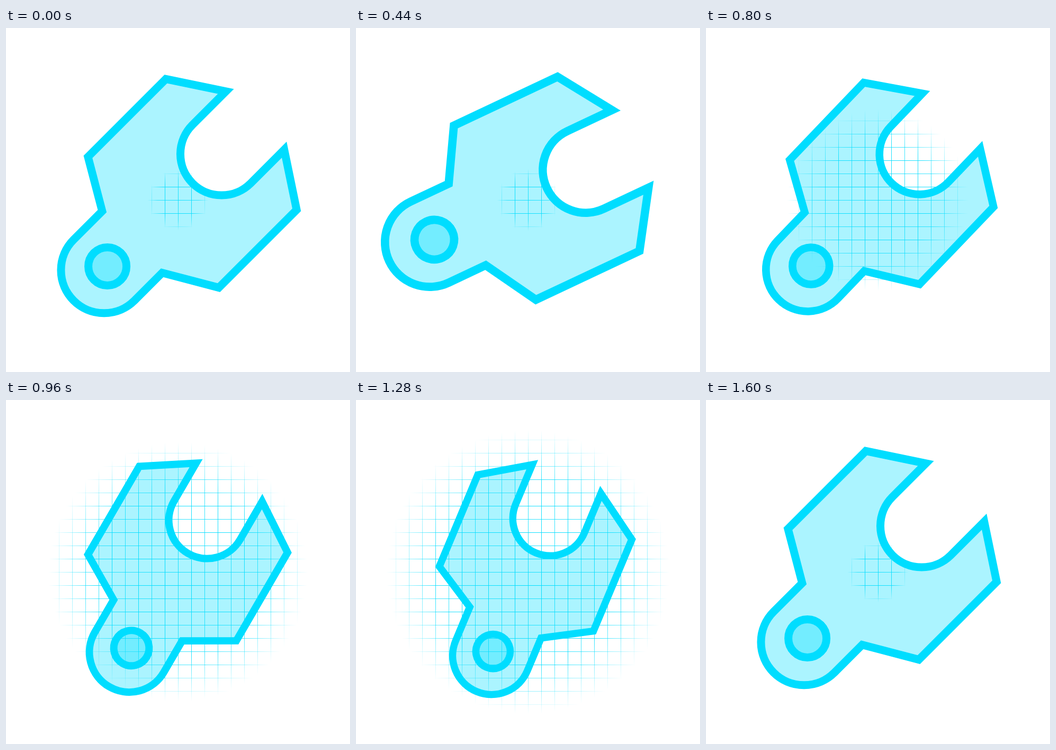
Recreate the animation shown at these times as an HTML page with a canvas. Size 650 by 650 pixels, loop 1.64 s.

```html
<!DOCTYPE html>
<html lang="en">
<head>
<meta charset="utf-8">
<title>Wrench</title>
<style>
  html, body { margin: 0; width: 100%; height: 100%; overflow: hidden; background: #fff; }
  canvas { display: block; width: 100vw; height: 100vh; }
</style>
</head>
<body>
<canvas id="stage" width="650" height="650"></canvas>
<script>
const SIZE = 650, CENTER = SIZE / 2, LOOP = 1640, STEP = 40;
const PIVOT = { x: 327, y: 318.5 };
const cyan = alpha => `rgba(0,221,255,${alpha})`;
const ctx = document.getElementById('stage').getContext('2d');

// Pose: [time, angle in degrees, scale, grid radius]
const poses = [
  [0, 45, 1, 58],
  [400, 25, 1.041, 58],
  [1200, 67.5, 0.902, 287],
  [1600, 45, 1, 58]
];
const easeInOut = u => u < 0.5 ? 2 * u * u : 1 - 2 * (1 - u) ** 2;
const easeOut = u => 1 - (1 - u) ** 2.5;
const easeIn = u => u ** 2.83;
const turnEases = [easeOut, easeInOut, easeIn];
const mix = (a, b, k) => a + (b - a) * k;

function poseAt(time) {
  const t = Math.min(time, 1600);
  const i = t < 400 ? 0 : t < 1200 ? 1 : 2;
  const from = poses[i], to = poses[i + 1];
  const u = (t - from[0]) / (to[0] - from[0]);
  const turn = turnEases[i](u);
  return {
    angle: mix(from[1], to[1], turn) * Math.PI / 180,
    scale: mix(from[2], to[2], turn),
    radius: mix(from[3], to[3], easeInOut(u))
  };
}

// The wrench lies along the x axis, jaw to the right.
function wrenchPath() {
  const p = new Path2D(), quarter = Math.PI / 2;
  p.moveTo(145.4, -174.8);
  p.lineTo(209.1, -77.9);
  p.arc(119.7, 0, 77.9, -quarter, quarter, true);
  p.lineTo(209.1, 77.9);
  p.lineTo(145.4, 174.8);
  p.lineTo(-62.6, 174.8);
  p.lineTo(-118.4, 79.3);
  p.arc(-192.5, -2, 81.3, quarter, 3 * quarter);
  p.lineTo(-116.1, -83.3);
  p.lineTo(-62.6, -174.8);
  p.closePath();
  return p;
}

const wrench = wrenchPath();
const hole = new Path2D();
hole.arc(-183, -2.5, 36, 0, 2 * Math.PI);

function drawWrench({ angle, scale }) {
  ctx.save();
  ctx.translate(PIVOT.x, PIVOT.y);
  ctx.rotate(-angle);
  ctx.scale(scale, scale);
  ctx.translate(-6, 0);
  ctx.strokeStyle = cyan(1);
  ctx.fillStyle = cyan(0.33);
  ctx.lineWidth = 15;
  for (const path of [wrench, hole]) {
    ctx.fill(path);
    ctx.stroke(path);
  }
  ctx.restore();
}

function drawGrid({ radius }) {
  const fade = ctx.createRadialGradient(CENTER, CENTER, 0, CENTER, CENTER, radius);
  fade.addColorStop(0, cyan(1));
  fade.addColorStop(0.65, cyan(0.85));
  fade.addColorStop(1, cyan(0));
  ctx.fillStyle = fade;
  for (let p = 25; p < SIZE; p += 25) {
    ctx.globalAlpha = p % 50 ? 0.85 : 1;
    ctx.fillRect(p, 0, 1, SIZE);
    ctx.fillRect(0, p, SIZE, 1);
  }
  ctx.globalAlpha = 1;
}

const start = performance.now();
function frame() {
  const elapsed = (performance.now() - start) % LOOP;
  const pose = poseAt(Math.floor(elapsed / STEP) * STEP);
  ctx.fillStyle = '#fff';
  ctx.fillRect(0, 0, SIZE, SIZE);
  drawWrench(pose);
  drawGrid(pose);
  requestAnimationFrame(frame);
}
frame();
</script>
</body>
</html>
```
